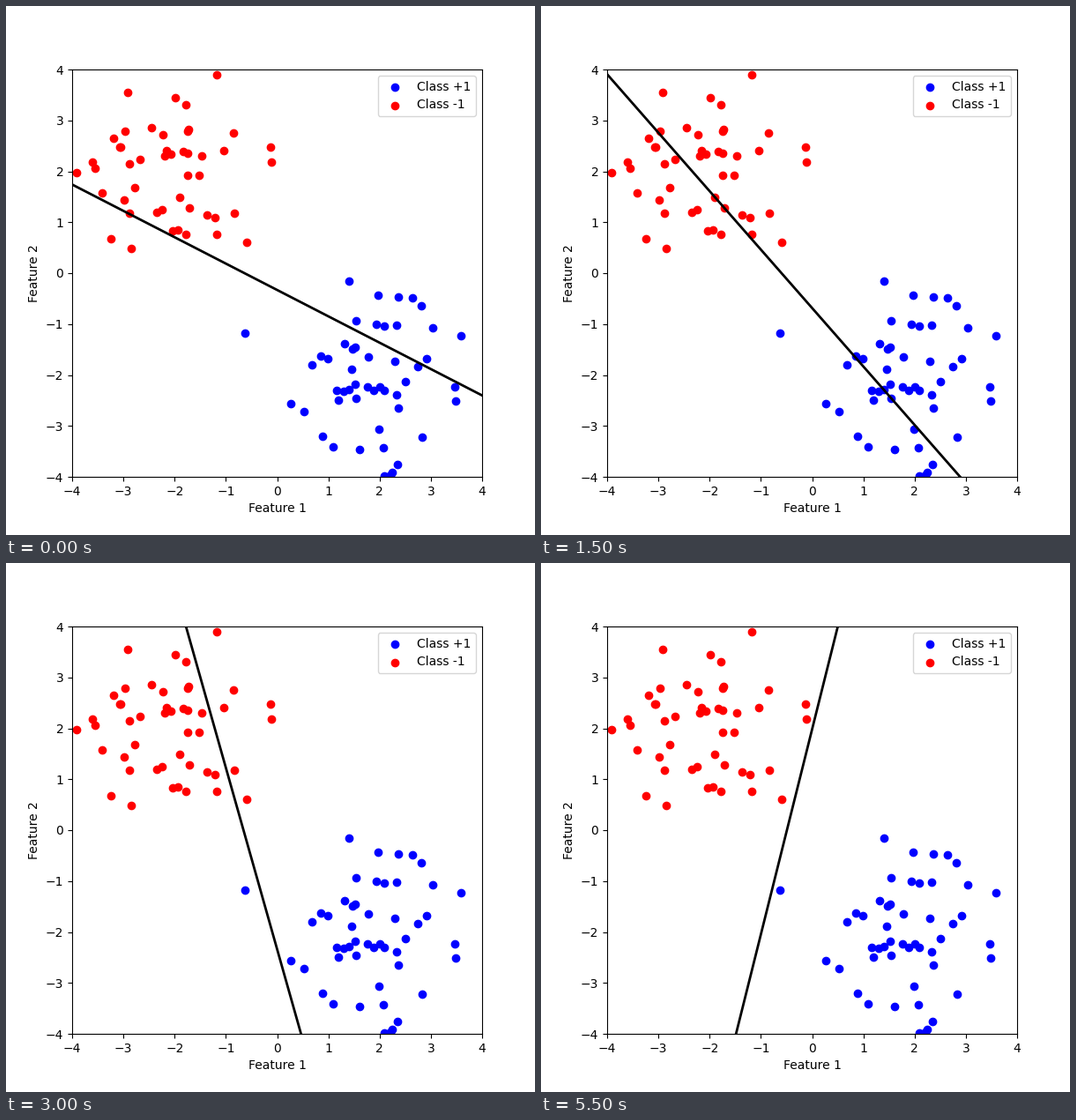
These frames come from a looping animation (600x600 px, 6 s). A matplotlib script:

```python
import numpy as np
import matplotlib.pyplot as plt
from matplotlib.animation import FuncAnimation

LIMIT = 4
LEARNING_RATE = 0.05

# Two Gaussian clusters, then random starting weights (bias, w1, w2)
np.random.seed(42)
positive = np.random.randn(50, 2) + [2, -2]
negative = np.random.randn(50, 2) + [-2, 2]
start = np.random.randn(3)


def train(weights, samples, labels):
    """Run the perceptron until it converges; return the weights after each update."""
    history = [weights]
    changed = True
    while changed:
        changed = False
        for x, y in zip(samples, labels):
            if y * (weights @ x) <= 0:
                weights = weights + LEARNING_RATE * y * x
                history.append(weights)
                changed = True
    return history


points = np.vstack([positive, negative])
samples = np.column_stack([np.ones(len(points)), points])
labels = np.repeat([1, -1], 50)
history = train(start, samples, labels)

fig, ax = plt.subplots(figsize=(6, 6), dpi=100)
ax.scatter(*positive.T, color="blue", label="Class +1")
ax.scatter(*negative.T, color="red", label="Class -1")
xs = np.array([-LIMIT, LIMIT])
boundary, = ax.plot([], [], color="black", linewidth=2)
ax.set(xlim=(-LIMIT, LIMIT), ylim=(-LIMIT, LIMIT),
       xlabel="Feature 1", ylabel="Feature 2")
ax.legend(loc="upper right")


def update(frame):
    bias, w1, w2 = history[frame]
    boundary.set_data(xs, -(bias + w1 * xs) / w2)
    return boundary,


anim = FuncAnimation(fig, update, frames=len(history), interval=500,
                     repeat=True, repeat_delay=0)
plt.show()
```
